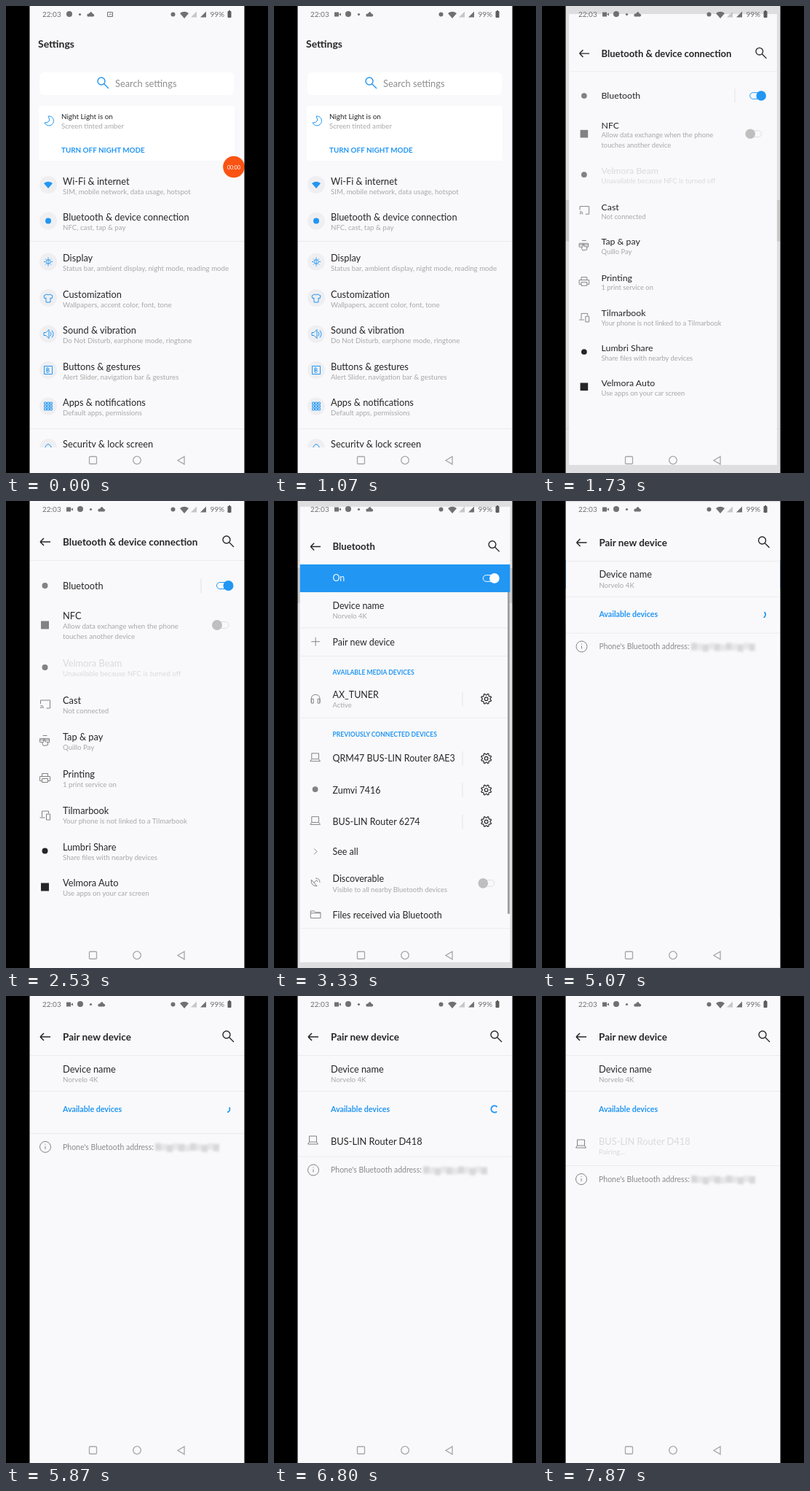
These frames come from a looping animation (360x640 px, 8000 ms). An HTML page:

```html
<!DOCTYPE html>
<html lang="en">
<head>
<meta charset="utf-8">
<title>Pairing a device</title>
<style>
  html, body { margin: 0; width: 100%; height: 100%; overflow: hidden; background: #000; }
  svg { display: block; width: 360px; height: 640px; font-family: Lato, sans-serif; }
  text { white-space: pre; }
</style>
</head>
<body>
<svg id="stage" viewBox="0 0 360 640"></svg>
<script>
const LOOP = 8000;
const BG = '#f9f9fb', INK = '#262626', SUB = '#a8a8a8', FAINT = '#dadadc';
const BLUE = '#2196f3', LINE = '#ebebed', GRAY = '#828282', STATUS = '#707070';

// Icon outlines are centred on 0,0.
const ring = (r, x = 0, y = 0) => `M${x - r} ${y}a${r} ${r} 0 1 0 ${2 * r} 0a${r} ${r} 0 1 0 ${-2 * r} 0`;
const gearOutline = () => {
  const points = Array.from({ length: 32 }, (_, i) => {
    const r = (i + 1) % 4 < 2 ? 5.5 : 7.3, a = (i + .5) * Math.PI / 16;
    return `${(r * Math.cos(a)).toFixed(1)} ${(r * Math.sin(a)).toFixed(1)}`;
  });
  return `M${points.join('L')}Z${ring(2.4)}`;
};
const grid = () => [-4, 0, 4].flatMap(x => [-4, 0, 4].map(y => `M${x - 1.4} ${y - 1.4}h2.8v2.8h-2.8z`)).join('');

const ICONS = {
  back: 'M-7 0H7M-7 0l5-5m-5 5l5 5',
  search: ring(5, -2, -2) + 'M2 2l6 6',
  moon: 'M-1-6A6.5 6.5 0 1 1-6 3Q4 3-1-6Z',
  wifi: 'M-6-2Q0-6.5 6-2L0 5Z',
  mark: ring(4),
  block: 'M-5.5-5.5h11v11h-11z',
  sun: ring(3) + 'M0-6v2M0 4v2M-6 0h2M4 0h2M-4-4l1 1M4-4l-1 1M-4 4l1-1M4 4l-1-1M0-3v6',
  shirt: 'M-2-5l-4 2 1 4 2-1v6h6v-6l2 1 1-4-4-2q-2 2-4 0z',
  sound: 'M-6-2h3l4-4v12l-4-4h-3zM3-3q2 3 0 6M5-5q4 5 0 10',
  button: 'M-5.5-5.5h11v11h-11zM-2-3v6h2.5q2-1.5 0-3h-2.5h2q2-1.5 0-3z',
  apps: grid(),
  bell: 'M-5 5h10M-4 5V-1q4-7 8 0V5M-1 2h2',
  cast: 'M-6-1v-5H7v11H2M-6 5v-1M-6 1q4 0 4 4M-6 3q2 0 2 2',
  tap: 'M-7-3H6v5H3M-7-3v5h4M-7-1H6M-3-7H3M-2 7l-2-4 2-1V-2q1-1 2 0v3l4 1v4z',
  printer: 'M-4-2v-4h8v4M-4 4h-3v-6H7v6H4M-4 1h8v5h-8z',
  devices: 'M-4 3v-8H5v3M-7 4h7M2-1h5v8h-5z',
  laptop: 'M-5-6H5v8H-5zM-5 2l-2 3H7l-2-3',
  plus: 'M-6 0H6M0-6V6',
  phones: 'M-6 5V0Q-6-6 0-6T6 0V5M-6 0h3v6h-3zM6 0h-3v6h3z',
  next: 'M-2-4l4 4-4 4',
  dish: 'M-6-4q-1 9 8 9zM-2 0l3-3M0-6q6 0 6 6M1-3q2 0 2 2',
  folder: 'M-7-5h5l2 2h7v8h-14zM-7-2h14',
  info: ring(7.5) + 'M0-1v4M0-4v1',
  gear: gearOutline(),
  camera: 'M-4-3h6v6h-6zM2 0l3-2v4z',
  cloud: 'M-4 3q-2-4 2-4q3-5 5 0q4 1 1 4z',
  picture: 'M-3-3h7v6h-7zM-1 1l2-2 2 2',
  triangle: 'M4-4v8h-8z',
};

const text = (x, y, str, size = 12.8, color = INK, extra = '') =>
  `<text x="${x}" y="${y + size * .36}" font-size="${size}" fill="${color}" ${extra}>${str}</text>`;
const bold = (x, y, str, size, color) => text(x, y, str, size, color, 'font-weight="700"');
const rect = (x, y, w, h, fill, extra = '') =>
  `<rect x="${x}" y="${y}" width="${w}" height="${h}" fill="${fill}" ${extra}/>`;
const circle = (x, y, r, fill) => `<circle cx="${x}" cy="${y}" r="${r}" fill="${fill}"/>`;
const icon = (name, x, y, color = GRAY, width = 1) =>
  `<path d="${ICONS[name]}" transform="translate(${x} ${y})" fill="none" stroke="${color}" stroke-width="${width}"/>`;
const solid = (name, x, y, color = STATUS) =>
  `<path d="${ICONS[name]}" transform="translate(${x} ${y})" fill="${color}"/>`;
const rule = y => rect(33, y, 295, 1, LINE);
const divider = (x, y) => rect(x, y - 10, 1, 20, '#e2e2e4');
const page = () => rect(32, 0, 296, 640, BG);
const press = (id, y, h) => rect(32, y, 296, h, '#000', `id="${id}" opacity="0"`);

function toggle(x, y, on, color) {
  const knob = on ? x + 8 : x - 8;
  return rect(x - 8, y - 4.5, 16, 9, 'none', `rx="4.5" stroke="${color}"`) +
    circle(knob, y, 7, on ? color : '#bfbfbf');
}
function header(title) {
  return icon('back', 54, 56, INK, 1.5) + bold(78, 56, title, 13.5) + icon('search', 305, 55, INK, 1.4);
}
const row = (y, label, sub = '', color = INK, subColor = SUB) =>
  text(78, y, label, 12.8, color) + text(78, y + 14.5, sub, 9.7, subColor);

function settingsScreen() {
  const rows = [
    [240, 'wifi', 'Wi-Fi &amp; internet', 'SIM, mobile network, data usage, hotspot'],
    [289.5, 'mark', 'Bluetooth &amp; device connection', 'NFC, cast, tap &amp; pay'],
    [345.5, 'sun', 'Display', 'Status bar, ambient display, night mode, reading mode'],
    [395, 'shirt', 'Customization', 'Wallpapers, accent color, font, tone'],
    [444.5, 'sound', 'Sound &amp; vibration', 'Do Not Disturb, earphone mode, ringtone'],
    [494, 'button', 'Buttons &amp; gestures', 'Alert Slider, navigation bar &amp; gestures'],
    [543.5, 'apps', 'Apps &amp; notifications', 'Default apps, permissions'],
    [600, 'bell', 'Security &amp; lock screen', ''],
  ];
  return page() + press('pressConnection', 266, 56) +
    bold(44, 52, 'Settings', 14) +
    rect(46, 91, 267, 31, '#fff', 'rx="6"') + icon('search', 133, 105, BLUE, 1.4) +
    text(150, 106.5, 'Search settings', 12.8, '#8e8e8e') +
    rect(45, 137, 269, 75, '#fff', 'rx="4"') + icon('moon', 59, 157, BLUE) +
    text(76, 151, 'Night Light is on', 9.9) + text(76, 165, 'Screen tinted amber', 9.7, SUB) +
    bold(76, 197.5, 'TURN OFF NIGHT MODE', 9.9, BLUE) +
    rule(322) + rule(579) +
    rows.map(([y, name, label, sub]) => circle(58, y + 5, 12, '#efeff2') +
      (name === 'wifi' || name === 'mark' ? solid : icon)(name, 58, y + 5, BLUE) + row(y, label, sub)).join('') +
    rect(32, 605, 296, 35, BG);
}

function connectionScreen() {
  const rows = [
    [273.5, 'cast', 'Cast', 'Not connected'],
    [323, 'tap', 'Tap &amp; pay', 'Quillo Pay'],
    [374, 'printer', 'Printing', '1 print service on'],
    [424.5, 'devices', 'Tilmarbook', 'Your phone is not linked to a Tilmarbook'],
    [474, 'mark', 'Lumbri Share', 'Share files with nearby devices'],
    [523.5, 'block', 'Velmora Auto', 'Use apps on your car screen'],
  ];
  return page() + press('pressBluetooth', 92, 48) +
    header('Bluetooth &amp; device connection') + rule(81) +
    solid('mark', 53.5, 116, GRAY) + row(116, 'Bluetooth') + divider(267.5, 116) + toggle(297.5, 116, true, BLUE) +
    solid('block', 53.5, 170, GRAY) + row(157.5, 'NFC', 'Allow data exchange when the phone') +
    text(78, 186, 'touches another device', 9.7, SUB) + toggle(298, 170, false, '#dedede') +
    solid('mark', 53.5, 228, GRAY) +
    row(222.5, 'Velmora Beam', 'Unavailable because NFC is turned off', FAINT, FAINT) +
    rows.map(([y, name, label, sub]) => (name === 'mark' || name === 'block' ?
      solid(name, 53.5, y + 5.5, INK) : icon(name, 53.5, y + 5.5)) + row(y, label, sub)).join('');
}

function bluetoothScreen() {
  const paired = [
    [353.5, 'laptop', 'QRM47 BUS-LIN Router 8AE3'],
    [398, 'mark', 'Zumvi 7416'],
    [442.5, 'laptop', 'BUS-LIN Router 6274'],
  ];
  return page() + press('pressPair', 171, 38) + header('Bluetooth') +
    rect(32, 81, 296, 39, BLUE) + text(78, 100.5, 'On', 12.8, '#f4f9ff') + toggle(298, 100.5, true, '#fff') +
    row(139, 'Device name', 'Norvelo 4K') + rule(169.5) +
    icon('plus', 54, 189.5) + row(190, 'Pair new device') + rule(209.5) +
    bold(78, 233, 'AVAILABLE MEDIA DEVICES', 8.8, BLUE) +
    icon('phones', 54, 270) + row(264.5, 'AX_TUNER', 'Active') + divider(260.5, 270) + icon('gear', 294.5, 270, INK, 1.2) +
    rule(296) + bold(78, 320, 'PREVIOUSLY CONNECTED DEVICES', 8.8, BLUE) +
    paired.map(([y, name, label]) => (name === 'mark' ? solid : icon)(name, 53.5, y - 1, GRAY) + row(y, label) +
      divider(260.5, y) + icon('gear', 294.5, y, INK, 1.2)).join('') +
    icon('next', 54, 484.5) + row(485, 'See all') +
    icon('dish', 54, 528) + row(523, 'Discoverable', 'Visible to all nearby Bluetooth devices') +
    toggle(298, 529, false, '#dedede') +
    icon('folder', 54, 573) + row(573.5, 'Files received via Bluetooth') + rule(592) +
    rect(324.5, 120, 3, 452, '#a0a0a2');
}

function pairScreen() {
  const hidden = Array.from({ length: 11 }, (_, i) =>
    rect(205 + i * 8, 194 + i % 3, 8, 10 - i % 2, i % 2 ? '#e6e6e8' : '#d8d8da')).join('');
  return page() + press('pressDevice', 181, 38) + header('Pair new device') + rule(81) +
    row(100, 'Device name', 'Norvelo 4K') + rule(130) +
    bold(78, 155, 'Available devices', 10.7, BLUE) +
    `<path id="spinner" fill="none" stroke="${BLUE}" stroke-width="1.8"/>` +
    `<g id="device"><g id="deviceIcon">${icon('laptop', 53.5, 198)}</g>` +
    text(78, 199.5, 'BUS-LIN Router D418', 12.8, INK, 'id="deviceName"') +
    text(78, 214, 'Pairing...', 9.7, FAINT, 'id="pairing"') + '</g>' +
    `<g id="address">${rule(180)}${icon('info', 54, 199)}` +
    text(78, 199, 'Phone\'s Bluetooth address:', 10.5, '#8a8a8a') +
    `<g style="filter:blur(1.5px)">${hidden}</g></g>`;
}

function statusBar() {
  const notes = (shift) => solid('mark', 87 + shift, 11) + circle(101.5 + shift, 11.5, 1.6, STATUS) +
    solid('cloud', 116 + shift, 11.5);
  return text(50, 11.5, '22:03', 10, STATUS) +
    `<g id="idleNotes">${notes(0)}${icon('picture', 142.5, 11.5, STATUS)}</g>` +
    `<g id="recordingNotes">${solid('camera', 87, 11.5)}${notes(15)}</g>` +
    circle(229.5, 11.5, 3, STATUS) + solid('wifi', 245, 12) + solid('triangle', 258, 11.5, '#c6c6c8') +
    solid('triangle', 271, 11.5) + text(280.5, 11.5, '99%', 10, STATUS) +
    rect(304.5, 7, 5, 9, '#5c5c5c', 'rx="1"') + rect(306, 6, 2, 1, '#5c5c5c');
}
function navigationBar() {
  return `<g fill="none" stroke="#a6a6a8" stroke-width="1.3">
    <rect x="114.5" y="617.5" width="10" height="10" rx="1"/><circle cx="180" cy="622.5" r="5.3"/>
    <path d="M245 617.5v10.5l-9-5.2z"/></g>`;
}

// Each new screen zooms in over the previous, dimmed one.
const openings = [
  { start: 1566, content: connectionScreen() },
  { start: 3130, content: bluetoothScreen() },
  { start: 4750, content: pairScreen() },
];
const stage = document.getElementById('stage');
stage.innerHTML = settingsScreen() +
  `<g id="bubble">${circle(0, 0, 14.8, '#fa5313')}${text(0, .5, '00:00', 7, '#fff', 'text-anchor="middle"')}</g>` +
  openings.map(({ content }, i) => `<g id="opening${i}">${rect(32, 0, 296, 640, '#000', `id="dim${i}"`)}` +
    `<g id="panel${i}">${content}</g></g>`).join('') +
  statusBar() + navigationBar() + rect(0, 0, 32.5, 640, '#000') + rect(327.5, 0, 33, 640, '#000');

const parts = Object.fromEntries([...stage.querySelectorAll('[id]')].map(el => [el.id, el]));
const set = (id, name, value) => parts[id].setAttribute(name, value);
const show = (id, visible) => set(id, 'display', visible ? 'inline' : 'none');
const ramp = (t, from, to) => Math.min(1, Math.max(0, (t - from) / (to - from)));
const easeOut = p => 1 - (1 - p) ** 2;
const pulse = (t, from, to) => ramp(t, from, from + 120) * (1 - ramp(t, to, to + 150));

function drawSpinner(t) {
  const sweep = 25 + 125 * (1 - Math.cos((t - 6133) / 1333 * 2 * Math.PI));
  const start = 45 + (t - 6800) * .471;
  const point = deg => {
    const a = deg * Math.PI / 180;
    return `${303 + 4.6 * Math.cos(a)} ${155 + 4.6 * Math.sin(a)}`;
  };
  set('spinner', 'd', `M${point(start)}A4.6 4.6 0 ${sweep > 180 ? 1 : 0} 1 ${point(start + sweep)}`);
}

function render(t) {
  const leaving = ramp(t, 350, 600);
  set('bubble', 'transform', `translate(313 220.5) scale(${1 - .3 * leaving})`);
  set('bubble', 'opacity', 1 - leaving);
  show('idleNotes', t < 600);
  show('recordingNotes', t >= 600);

  set('pressConnection', 'opacity', .1 * ramp(t, 1400, 1560));
  set('pressBluetooth', 'opacity', .1 * ramp(t, 2970, 3130));
  set('pressPair', 'opacity', .1 * ramp(t, 4560, 4720));
  set('pressDevice', 'opacity', .1 * pulse(t, 7180, 7380));

  openings.forEach(({ start }, i) => {
    const p = ramp(t, start, start + 400), scale = .9 + .1 * easeOut(p);
    show('opening' + i, t >= start);
    set('dim' + i, 'opacity', .11 * Math.min(1, p * 3));
    set('panel' + i, 'opacity', Math.min(1, p * 3));
    set('panel' + i, 'transform', `translate(180 320) scale(${scale}) translate(-180 -320)`);
  });

  const found = easeOut(ramp(t, 5850, 6050)), pairing = t >= 7430;
  const grow = easeOut(ramp(t, 7430, 7560));
  set('device', 'opacity', ramp(t, 5950, 6100));
  set('deviceIcon', 'transform', `translate(0 ${5 * grow})`);
  set('deviceName', 'fill', pairing ? FAINT : INK);
  show('pairing', pairing);
  show('spinner', !pairing);
  set('address', 'transform', `translate(0 ${39.5 * found + 12.5 * grow})`);
  drawSpinner(t);
}

const began = performance.now();
function frame() {
  render((performance.now() - began) % LOOP);
  requestAnimationFrame(frame);
}
frame();
</script>
</body>
</html>
```
